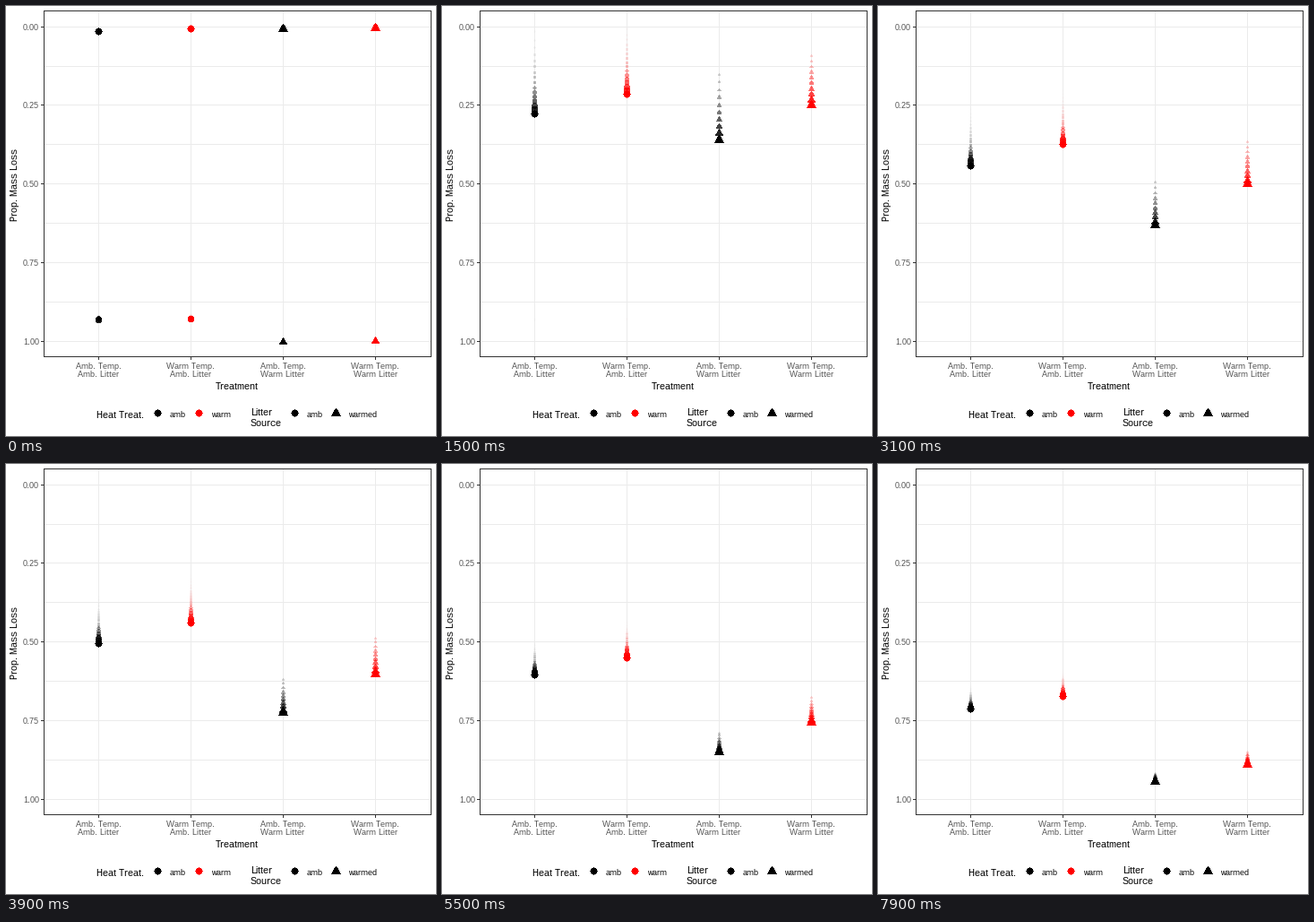
Write a matplotlib script that moves like this. It is 480 by 480 pixels and loops after 8000 ms.

```python
import numpy as np
import matplotlib.pyplot as plt
from matplotlib.animation import FuncAnimation
from matplotlib.collections import PolyCollection
from matplotlib.colors import to_rgba
from matplotlib.patches import Rectangle

plt.rcParams.update({
    "font.family": "Liberation Sans",
    "text.hinting": "native",
    "text.hinting_factor": 1,
    "text.kerning_factor": 0,
})

SIZE, DPI = 480, 80
PX = 72 / DPI                      # points per pixel
FRAMES, STEP = 80, 100
CYCLE, WAKE = 200, 20              # full run and wake length, in steps
LEFT, RIGHT, TOP, BOTTOM = 42, 474, 5, 391
Y0, Y_SCALE = 23.2, 351
COLS = [103, 206, 309, 412]
GRID, DARK, GREY = "#ebebeb", "#333333", "#4d4d4d"

# column, colour, shape, decay scale, decay exponent
SERIES = [
    (COLS[0], "black", "circle", 0.323, 0.826),
    (COLS[1], "red", "circle", 0.2408, 0.938),
    (COLS[2], "black", "triangle", 0.445, 1.1354),
    (COLS[3], "red", "triangle", 0.286, 1.245),
]

fig = plt.figure(figsize=(SIZE / DPI, SIZE / DPI), dpi=DPI, facecolor="white")
ax = fig.add_axes([0, 0, 1, 1])
ax.set(xlim=(0, SIZE), ylim=(SIZE, 0))
ax.axis("off")

ANGLES = np.linspace(0, 2 * np.pi, 32, endpoint=False)
CIRCLE = np.column_stack([np.cos(ANGLES), np.sin(ANGLES)])
TRIANGLE = np.array([[0, -1.555], [1.347, 0.777], [-1.347, 0.777]])


def row(value):
    return int(Y0 + Y_SCALE * value)


def box(x, y, w, h, color):
    ax.add_patch(Rectangle((x, y), w, h, fc=color, lw=0, antialiased=False))


def label(x, y, text, size=9, color="black", **kw):
    kw.setdefault("va", "baseline")
    ax.text(x, y, text, fontsize=size * PX, color=color, **kw)


def marker(shape, x, y, scale=1.0):
    """Pixel-aligned outline of a point; scale 1 is the full size."""
    cx, cy = x + 0.5, int(y) + 0.5
    if shape == "circle":
        return CIRCLE * (0.57 + 2.95 * scale) + (cx, cy)
    radius = 3.66 if scale == 1 else 0.4 + 2.75 * scale
    return TRIANGLE * radius + (cx, cy + 0.5)


def loss(step, rate, power):
    return 1 - np.exp(-rate * ((step + 0.4) / 15.4) ** power)


def draw_panel():
    for v in np.arange(0, 1.01, 0.125):
        box(LEFT, row(v), RIGHT - LEFT, 1, GRID)
    for x in COLS:
        box(x, TOP, 1, BOTTOM - TOP, GRID)
        box(x, BOTTOM + 1, 1, 3, DARK)
    for v in np.arange(0, 1.01, 0.25):
        box(LEFT - 3, row(v), 3, 1, DARK)
        label(37, row(v) + 4, f"{v:.2f}", color=GREY, ha="right")
    for y in (TOP, BOTTOM):
        box(LEFT, y, RIGHT - LEFT + 1, 1, DARK)
    for x in (LEFT, RIGHT):
        box(x, TOP, 1, BOTTOM - TOP + 1, DARK)

    for i, x in enumerate(COLS):
        temp = ("Amb.", "Warm")[i % 2]
        litter = ("Amb.", "Warm")[i // 2]
        dot = "." if temp == "Warm" else ""
        label(x, 405, f"{temp} Temp.", color=GREY, ha="center")
        label(x, 414, f"{litter} Litter", color=GREY, ha="center")
    label(258, 428, "Treatment", 11, ha="center")
    label(15, 199, "Prop. Mass Loss", 11, rotation=90, ha="right",
          va="center", rotation_mode="default")


def draw_legend():
    label(101, 460, "Heat Treat.", 11)
    label(273, 457, "Litter", 11)
    label(273, 469, "Source", 11)
    keys = [
        (169, "black", "circle", "amb"),
        (215, "red", "circle", "warm"),
        (322, "black", "circle", "amb"),
        (368, "black", "triangle", "warmed"),
    ]
    for x, color, shape, text in keys:
        ax.add_collection(PolyCollection(
            [marker(shape, x, 454)], facecolors=color, linewidths=0,
            antialiaseds=False), autolim=False)
        label(x + 14, 459, text)


draw_panel()
draw_legend()
points = PolyCollection([], linewidths=0, antialiaseds=False, zorder=3)
ax.add_collection(points, autolim=False)


def update(n):
    verts, colors = [], []
    for age in range(WAKE - 1, -1, -1):
        fade = (1 - age / WAKE) ** 3
        step = (n - age) % CYCLE
        for x, color, shape, rate, power in SERIES:
            if shape == "triangle" and age > 9:
                continue           # too small to show
            y = Y0 + Y_SCALE * loss(step, rate, power)
            verts.append(marker(shape, x, y, fade))
            colors.append(to_rgba(color, fade))
    points.set_verts(verts)
    points.set_facecolor(colors)
    return [points]


anim = FuncAnimation(fig, update, frames=FRAMES, interval=STEP,
                     repeat=True, blit=False)
plt.show()
```
